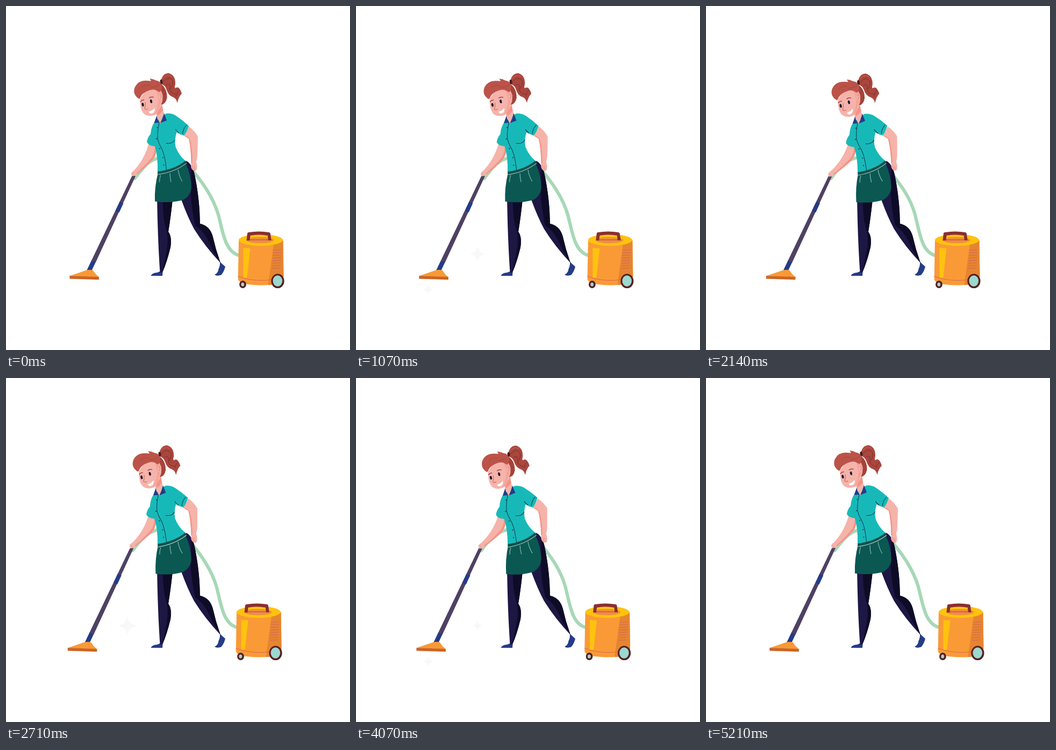
Animation of 640 by 640 pixels, one loop 5280 ms. Source, as an HTML page with a canvas:

```html
<!DOCTYPE html>
<html lang="en">
<head>
<meta charset="utf-8">
<title>Vacuum cleaning</title>
<style>
html, body { margin: 0; height: 100%; overflow: hidden; background: #fff; }
canvas { display: block; width: 100vw; height: 100vh; }
</style>
</head>
<body>
<canvas id="stage" width="640" height="640"></canvas>
<script>
const ctx = document.getElementById('stage').getContext('2d');
const LOOP = 5280, STEP = LOOP / 74, SWING = 1320;

const SKIN = '#f5b3aa', BLUSH = '#f39386', TEAL = '#17b9b8', APRON = '#0b5852',
  BLUE = '#243b87', NAVY = '#1d1744', NIGHT = '#0e0b27', HAIR = '#bb5349',
  HAIR_DARK = '#a4433a', ORANGE = '#f99a36', YELLOW = '#ffc20e', MINT = '#a7d8b6',
  MAROON = '#8b2e30', INK = '#12344f';

function fill(path, color) {
  ctx.fillStyle = color;
  ctx.fill(new Path2D(path));
}

function line(path, color, width = 1, cap = 'round') {
  ctx.strokeStyle = color;
  ctx.lineWidth = width;
  ctx.lineCap = cap;
  ctx.stroke(new Path2D(path));
}

function oval(x, y, rx, ry, color, tilt = 0) {
  ctx.fillStyle = color;
  ctx.beginPath();
  ctx.ellipse(x, y, rx, ry, tilt, 0, Math.PI * 2);
  ctx.fill();
}

function shifted(dx, dy, draw) {
  ctx.save();
  ctx.translate(dx, dy);
  draw();
  ctx.restore();
}

const clamp = v => Math.max(0, Math.min(1, v));
const ramp = (t, a, b) => clamp((t - a) / (b - a));

// Cubic bezier easing, solved by bisection
function ease(u) {
  const curve = (s, a, b) => 3 * s * (1 - s) * (1 - s) * a + 3 * s * s * (1 - s) * b + s * s * s;
  let lo = 0, hi = 1;
  for (let i = 0; i < 24; i++) {
    const mid = (lo + hi) / 2;
    if (curve(mid, .14, .12) < u) lo = mid; else hi = mid;
  }
  return curve(lo, .08, 1);
}

// 0 = pulled back, 1 = pushed forward
function reach(t) {
  const half = SWING / 2, u = t % SWING;
  return u < half ? ease(u / half) : 1 - ease((u - half) / half);
}

function sparkle(x, y, r) {
  if (r < .5) return;
  shifted(x, y, () => {
    const k = r * .16;
    fill(`M0 ${-r}Q${k} ${-k} ${r} 0Q${k} ${k} 0 ${r}Q${-k} ${k} ${-r} 0Q${-k} ${-k} 0 ${-r}Z`, '#f8f8f8');
  });
}

function sparkles(t) {
  const a = t % 1760, b = t % 2640;
  sparkle(226, 461, 17.5 * Math.min(ramp(a, 400, 660), 1 - ramp(a, 950, 1740)));
  sparkle(134.7, 527.5, 9.7 * Math.min(ramp(b, 0, 560), 1 - ramp(b, 1430, 2050)));
}

function hose(p) {
  const c = -16.3 * p, top = 18 * p;
  line(`M${436 + c} 464.5C${411 + c} 460 ${405 - 14 * p} 430 ${398 - 14.5 * p} 400
    C${391 - 13 * p} 367 ${372 - 7 * p} ${335 + top * .7} 346 ${305 + top}`, MINT, 6.2);
  line(`M${288 - 2 * p} ${282 - 2 * p}C${266 - 4 * p} ${285 - 3 * p} ${255 - 15 * p} ${301 - 8 * p} ${239.5 - 16 * p} 321`, MINT, 6);
}

function canister() {
  fill('M433 436L431.7 508Q433 519 475 519.5Q515 519 516.5 503L515.5 436Z', ORANGE);
  fill('M498 443L487.5 519.3Q515 518 516.5 503L515.5 436Z', '#e68530');
  fill('M441.5 450L454.5 451L448.5 505L441.5 506.5Z', YELLOW);
  line('M432 503Q462 514 494 509', '#d7685a', 1.1);
  for (let i = 0; i < 8; i++) {
    const y = 454.5 + i * 4.8;
    line(`M${497.5 - i * .3} ${y}L${512 - i * .3} ${y - .8}`, '#d4665a', 1.1);
  }
  oval(474, 435.5, 41, 10.7, YELLOW);
  oval(473, 435.5, 25.5, 6, '#ef8f3a');
  fill('M453.5 428.5Q470 426 487.5 428.5L488 430.5Q470 428.5 453.5 430.5Z', YELLOW);
  line('M453 435H489', '#d65c62', 1.8);
  fill('M447.5 436.3L449 423Q449.3 421.2 452 421Q470 418 489 421Q491.5 421.3 491.8 423L493.7 436H488L486.8 427Q470 424 454.6 427L453.4 436.3Z', MAROON);
  oval(505.5, 511.7, 12.1, 13.4, '#582021');
  oval(505.3, 511.5, 8.8, 10.2, '#9cd8cf');
  oval(440.5, 518, 6.4, 6.9, '#582021');
  oval(440.3, 518, 2.9, 3.5, '#9cd8cf');
}

function wand() {
  fill('M235.6 313.8L241 316.4L166.6 477.5L158.8 474Z', '#4e4163');
  line('M215 365.5L207.2 382.5', BLUE, 7.6, 'butt');
  fill('M159 473.5L166.6 477L159.5 492H150.2Z', BLUE);
  fill('M118.3 502.3L150.5 491.3Q157 490 161.5 491.5Q166 499 173 504.6Z', ORANGE);
  fill('M118.3 502L173 504L172.8 509.2L118.4 507.5Z', '#cb6526');
}

function legs() {
  fill('M269.5 502Q272 496.5 281 496L286 494L291.5 495L291 502Z', BLUE);
  fill('M398 476L408 485Q405 496 400 500.5Q393 503 388 500Q394.5 497 395.5 489Q398.5 484 398 476Z', BLUE);
  fill('M335 288Q347 293 352 319Q358 350 360 380L361 405Q379 409 384.5 428Q390 453 399 478Q370 447 350 415Q338 393 326 360L318 325Z', NAVY);
  fill('M345 297Q350 306 352 319Q358 350 360 380L361 405Q379 409 384.5 428Q390 453 399 478Q384 455 377 438Q368 419 352 408Q345 378 344 350Z', NIGHT);
  fill('M281 350L311 350Q307 390 302 420Q309 429 306 449Q299 478 291 496H286.5Q282 430 281 350Z', NAVY);
  fill('M292 350L311 350Q307 390 302 420Q309 429 306 449Q299 478 290.5 496Q297 468 300 448Q303 430 296 408Q291 386 292 350Z', NIGHT);
}

// The hem stays closer to the hips than the rest of the body
function apron(p) {
  const back = -3 * p, front = 1.5 * p;
  fill(`M283 310Q312 305 334 292Q${345 + back} 315 ${344.8 + back} 338Q${343 + back} 354 ${329 + back} 361
    Q304 367.5 ${277 + front} 363.5Q${276 + front} 336 283 310Z`, APRON);
  fill('M282 307Q312 303 333 287L337 293Q314 309 282.4 314Z', '#0d514c');
  line('M283 313.5Q313 309.5 335.5 293', '#b4d6d2', 1);
  line('M287.5 315Q285.5 321 285.5 327M305 311.5Q305 320 307 327M320 305Q322 317 327.5 326', '#9bc8c4', 1);
}

function shirt() {
  fill('M277 215L298 200Q308 199 316 204Q328 212 340 223Q337 234 331 241Q323 239 317.5 235Q313 249 315.5 262Q321 277 333.5 288Q314 304 282 308Q283 282 277 261Q265 260 262 253Q263 245 269 238Q270 224 277 215Z', TEAL);
  line('M285 217Q281 232 282 247Q284 256 289 264Q296 277 298.5 305M335.5 222Q329 229 328.5 238M315.5 229.5Q317 233 322 236M298.5 255.5Q310 257 314.5 249', INK, 1);
  for (const [x, y] of [[281.5, 226], [280, 247], [286, 265], [292, 282], [293.5, 296]]) oval(x, y, 1, 1.1, INK);
  fill('M278 198L290 180L293.5 201L287 219L280.5 205Z', SKIN);
  fill('M281.5 198L290 184L292 194Q287 201 282 204Z', BLUSH);
  fill('M280.5 204L275.5 217.5L285.5 217L282 210Z', BLUE);
  fill('M294 199L299 213L287 217.5Q292 209 294 199Z', BLUE);
}

function backArm() {
  fill('M340 224Q351 232 357 243L356.3 272Q356 284 353.8 290Q357 299 354.5 305.5Q350 308.5 346 304L344.3 300L344.5 291Q344 262 340 247Q335 243 330 240.5Q337 233 340 224Z', SKIN);
  fill('M330 240.5Q339 242 342.5 249Q347 268 346.7 291L344.5 293Q344 262 340 247Z', BLUSH);
  line('M347.5 297L348 304.5M350.8 298L351.3 306', '#e98a80', .9);
}

function head() {
  fill('M288 145Q300 153 299.5 171Q297 183 288.5 183.5L284 158Z', HAIR_DARK);
  fill('M288 140Q291 125 303 125Q316 129 315 146Q313 151 315 153Q322 147 327 163Q321 169 318.5 180.5Q317 172 311 169.5Q302 167 298.5 155Q296 147 288 145Z', '#a9463d');
  line('M293 140Q303 129 310 139Q312 147 306 154M298 147Q307 141 305 156Q307 164 317 164M322 157Q318 161 317 167', '#7d2d2c', .9);
  line('M292 134Q300 126 308 131', HAIR, 2);
  fill('M249.5 172Q249 196 258.5 202Q268 207 277.5 202Q283 199 286.5 185Q293 180 291 164L287 154H262Z', SKIN);
  fill('M277 154L288 157Q292 172 286.5 184Q283 200 274.5 203.5Q281 194 283.5 180Q284 163 277 154Z', '#f5a399');
  oval(288, 168.5, 3.4, 6.3, SKIN, .15);
  line('M287 165Q290 163 289 168L287.5 172', '#df786f', 1);
  fill('M247 172.5Q234.5 164 240 150.5Q247 137.5 263 139L270 139.5L267.5 135Q274 135.5 279 138.5Q290 140 289.5 152Q288 162 283 159Q276 153 266 157Q253 161 249 172Z', HAIR);
  line('M252 152Q260 145 268 148M269 151Q278 152 286 146', '#a74239', .9);
  oval(289, 141, 2.4, 4.2, '#4a1d1d', -.15);
  oval(254.5, 183.5, 2, 3.5, '#1b1334', -.2);
  oval(270, 177.3, 2, 3.5, '#1b1334', -.2);
  line('M250.3 178Q252 175 256.5 174.7', '#a3443c', 1.5);
  line('M266.5 171Q269.5 168.3 274 169.5', '#a3443c', 1.5);
  line('M259 179.5Q260 186 257.8 191Q260 194 264 191.5', '#c96158', 1);
  fill('M265.5 196.5Q272.5 195 276.5 189.5Q278 199 270 200Q267 200 265.5 196.5Z', '#fff');
}

// Points slide between the shoulder's shift and the hand's shift
function frontArm(p) {
  const at = (x, y, w) => {
    const dx = p * (-3 - 10.5 * w), dy = p * (4 - 1.5 * w);
    return `${x + dx} ${y + dy} `;
  };
  fill(`M${at(266, 254, 0)}L${at(280, 256, 0)}Q${at(282, 274, .1)}${at(274, 285, .3)}
    Q${at(260, 300, .6)}${at(245, 312, 1)}Q${at(241, 317, 1)}${at(238, 316, 1)}
    L${at(234.5, 316.5, 1)}Q${at(230.5, 310, 1)}${at(238, 306, 1)}
    Q${at(258, 285, .4)}${at(266, 254, 0)}Z`, SKIN);
  fill(`M${at(277, 256, 0)}L${at(280, 256, 0)}Q${at(282, 274, .1)}${at(274, 285, .3)}
    Q${at(260, 300, .6)}${at(245, 312, 1)}L${at(242, 312, 1)}
    Q${at(258, 298, .6)}${at(272, 281, .3)}Q${at(278, 270, .1)}${at(277, 256, 0)}Z`, BLUSH);
  line(`M${at(236, 311, 1)}L${at(238.5, 314.5, 1)}`, '#e98a80', .8);
}

function draw(t) {
  const p = reach(t);
  ctx.fillStyle = '#fff';
  ctx.fillRect(0, 0, 640, 640);
  sparkles(t);
  hose(p);
  shifted(-16.4 * p, 0, canister);
  shifted(-14.9 * p, 0, wand);
  legs();
  frontArm(p);
  ctx.save();
  ctx.translate(322, 305);
  ctx.rotate(-.075 * p);
  ctx.translate(-322, -305);
  apron(p);
  shifted(1.2 * p, 1.2 * p, backArm);
  shirt();
  head();
  ctx.restore();
}

function tick() {
  const t = performance.now() % LOOP;
  draw(Math.floor((t + 5) / STEP) % 74 * STEP);
  requestAnimationFrame(tick);
}
tick();
</script>
</body>
</html>
```
